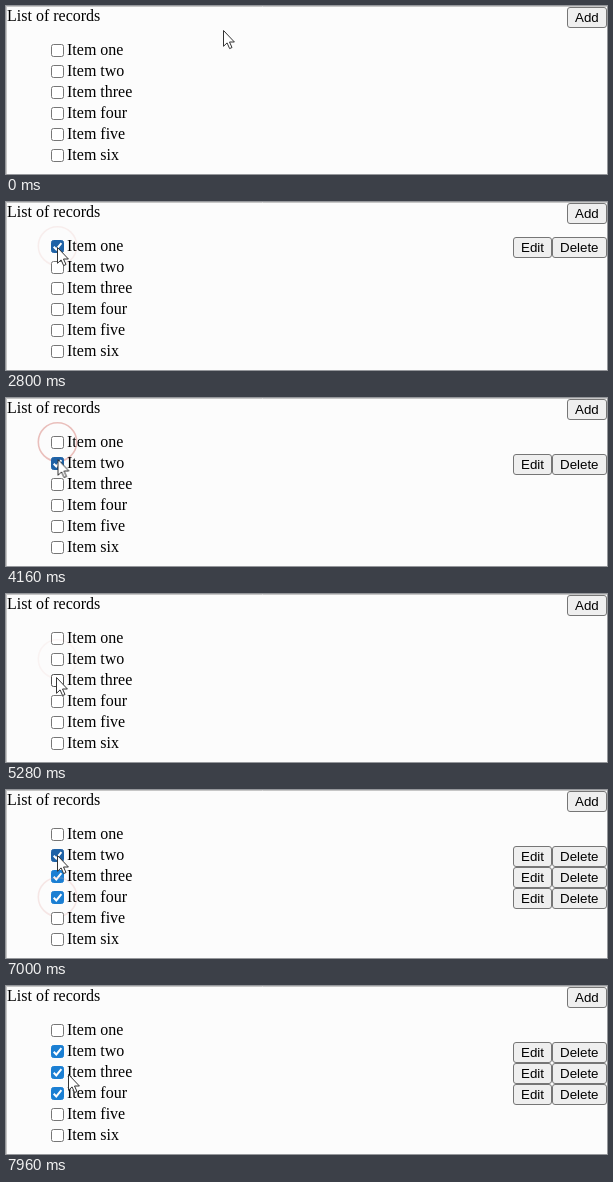
Write an HTML page that moves like this. It is 601 by 168 pixels and loops after 8000 ms.

```html
<!DOCTYPE html>
<html lang="en">
<head>
<meta charset="utf-8">
<title>List of records</title>
<style>
html, body { margin: 0; width: 100%; height: 100%; overflow: hidden; background: #fcfcfc; }
svg { display: block; width: 601px; height: 168px; }
text { font: 16px "Liberation Serif", "Times New Roman", serif; fill: #000; }
.btn text { font: 13.333px "Liberation Sans", Arial, sans-serif; }
.btn rect { fill: #efefef; stroke: #767676; }

/* Checkbox states; the white tick only shows on a filled box */
.box { fill: #fff; stroke: #767676; }
.tick { fill: none; stroke: #fff; stroke-width: 2; }
.ring { fill: none; stroke: #e2a5a0; stroke-width: 1.6; opacity: 0; }
.box, .acts, .ring, #cursor { animation: 8s linear infinite; }
.box, .acts { animation-timing-function: step-end; }
.acts { visibility: hidden; }

#r1 .box { animation-name: box1; }
#r2 .box { animation-name: box2; }
#r3 .box { animation-name: box3; }
#r4 .box { animation-name: box4; }
#r1 .acts { animation-name: acts1; }
#r2 .acts { animation-name: acts2; }
#r3 .acts { animation-name: acts3; }
#r4 .acts { animation-name: acts4; }
#r1 .ring { animation-name: ring1; }
#r2 .ring { animation-name: ring2; }
#r3 .ring { animation-name: ring3; }
#r4 .ring { animation-name: ring4; }
#cursor { animation-name: move; }

@keyframes box1 {
  0%, 49.5% { fill: #fff; stroke: #767676; }
  16.5%, 46.25% { fill: #fff; stroke: #4f4f4f; }
  31.25% { fill: #1f62a6; stroke: #1f62a6; }
}
@keyframes box2 {
  0%, 63% { fill: #fff; stroke: #767676; }
  50%, 60%, 84.5% { fill: #fff; stroke: #4f4f4f; }
  51%, 87% { fill: #1f62a6; stroke: #1f62a6; }
  93.5%, 100% { fill: #1b7fd3; stroke: #1b7fd3; }
}
@keyframes box3 {
  0% { fill: #fff; stroke: #767676; }
  65% { fill: #fff; stroke: #4f4f4f; }
  73.75% { fill: #1f62a6; stroke: #1f62a6; }
  77%, 100% { fill: #1b7fd3; stroke: #1b7fd3; }
}
@keyframes box4 {
  0% { fill: #fff; stroke: #767676; }
  78% { fill: #fff; stroke: #4f4f4f; }
  80% { fill: #1f62a6; stroke: #1f62a6; }
  82.5%, 100% { fill: #1b7fd3; stroke: #1b7fd3; }
}

@keyframes acts1 { 0%, 46.25% { visibility: hidden; } 31.25% { visibility: visible; } }
@keyframes acts2 { 0%, 60% { visibility: hidden; } 51%, 87%, 100% { visibility: visible; } }
@keyframes acts3 { 0% { visibility: hidden; } 73.75%, 100% { visibility: visible; } }
@keyframes acts4 { 0% { visibility: hidden; } 80%, 100% { visibility: visible; } }

@keyframes ring1 {
  0%, 31.5%, 37.5%, 47%, 55%, 100% { opacity: 0; }
  32%, 47.5% { opacity: 1; }
  34.5% { opacity: .2; }
  52% { opacity: .7; }
}
@keyframes ring2 {
  0%, 52.1%, 57%, 60.5%, 68%, 87.8%, 93%, 100% { opacity: 0; }
  53%, 61%, 88.5% { opacity: .9; }
  65% { opacity: .15; }
}
@keyframes ring3 {
  0%, 74.5%, 80%, 100% { opacity: 0; }
  75% { opacity: .9; }
}
@keyframes ring4 {
  0%, 80.6%, 90%, 100% { opacity: 0; }
  81.2% { opacity: .9; }
  87% { opacity: .3; }
}

@keyframes move {
  0%, 1% { transform: translate(217px, 24px); }
  3%, 7% { transform: translate(104px, 12px); }
  11.5% { transform: translate(88px, 146px); }
  13% { transform: translate(70px, 120px); }
  17%, 18.5% { transform: translate(53.5px, 44px); }
  21.5%, 24% { transform: translate(55px, 47px); }
  24.5%, 47.5% { transform: translate(51px, 45px); }
  50.5%, 61% { transform: translate(51.5px, 61px); }
  65.5%, 75% { transform: translate(50px, 83px); }
  78.5%, 82% { transform: translate(51px, 105px); }
  85.5%, 91% { transform: translate(51px, 65px); }
  95% { transform: translate(60px, 78px); }
  99.5%, 100% { transform: translate(62px, 88px); }
}
</style>
</head>
<body>
<svg viewBox="0 0 601 168">
  <defs>
    <g id="pair" class="btn">
      <rect x="507.5" y="-8.5" width="38" height="20" rx="2.5"/>
      <text x="515" y="6">Edit</text>
      <rect x="546.5" y="-8.5" width="54" height="20" rx="2.5"/>
      <text x="554" y="6">Delete</text>
    </g>
    <path id="tick" class="tick" d="M47.7 .8L50.3 3.4L55.4 -2.8"/>
    <circle id="ring" cx="51.5" cy="0" r="19.2"/>
  </defs>

  <path d="M0 .5H601M.5 0V168" stroke="#c6c6c6"/>
  <text x="1" y="15">List of records</text>
  <g class="btn">
    <rect x="561.5" y="1.5" width="39" height="20" rx="2.5"/>
    <text x="569" y="16">Add</text>
  </g>

  <g id="r1" transform="translate(0 44)">
    <rect class="box" x="45.5" y="-5.5" width="12" height="12" rx="2"/>
    <use href="#tick"/><text x="61" y="5">Item one</text>
    <use class="acts" href="#pair"/><use class="ring" href="#ring"/>
  </g>
  <g id="r2" transform="translate(0 65)">
    <rect class="box" x="45.5" y="-5.5" width="12" height="12" rx="2"/>
    <use href="#tick"/><text x="61" y="5">Item two</text>
    <use class="acts" href="#pair"/><use class="ring" href="#ring"/>
  </g>
  <g id="r3" transform="translate(0 86)">
    <rect class="box" x="45.5" y="-5.5" width="12" height="12" rx="2"/>
    <use href="#tick"/><text x="61" y="5">Item three</text>
    <use class="acts" href="#pair"/><use class="ring" href="#ring"/>
  </g>
  <g id="r4" transform="translate(0 107)">
    <rect class="box" x="45.5" y="-5.5" width="12" height="12" rx="2"/>
    <use href="#tick"/><text x="61" y="5">Item four</text>
    <use class="acts" href="#pair"/><use class="ring" href="#ring"/>
  </g>
  <g transform="translate(0 128)">
    <rect class="box" x="45.5" y="-5.5" width="12" height="12" rx="2"/>
    <text x="61" y="5">Item five</text>
  </g>
  <g transform="translate(0 149)">
    <rect class="box" x="45.5" y="-5.5" width="12" height="12" rx="2"/>
    <text x="61" y="5">Item six</text>
  </g>

  <path id="cursor" d="M.5 .5V16.3L4.1 12.9L6.6 18.6L9 17.5L6.5 12H11.4Z" fill="#fff" stroke="#333"/>
</svg>
</body>
</html>
```
